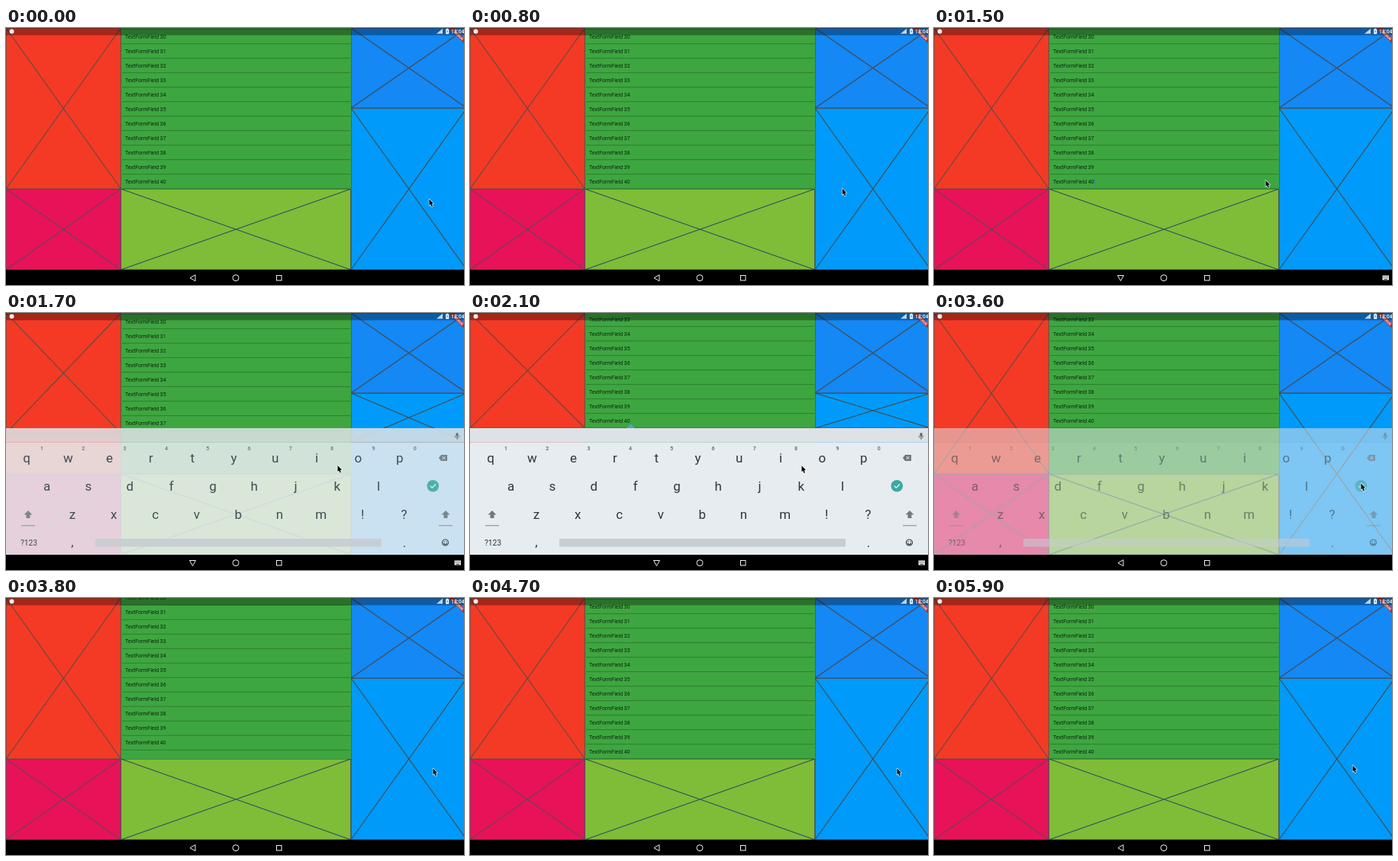
These frames come from a looping animation (600x337 px, 6 s). An HTML page with a canvas:

```html
<!DOCTYPE html>
<html lang="en">
<head>
<meta charset="utf-8">
<title>Form list with keyboard</title>
<style>
html, body { margin: 0; width: 100%; height: 100%; overflow: hidden; background: #000; }
canvas { display: block; width: 600px; height: 337px; }
</style>
</head>
<body>
<canvas id="stage" width="600" height="337"></canvas>
<script>
const c = document.getElementById('stage').getContext('2d');
const LOOP = 6000, STEP = 100;
const FOCUS = 1500, HIDE = 3600;
const BODY = 317, UPPER = 211, KEYS_TOP = 151, ROW = 19;
const RIGHT = 603.5; // the screen is cropped slightly at the right

// time, x, y of the pointer tip
const pointerPath = [
  [0, 554, 224], [300, 554, 224], [1200, 434, 199], [2400, 434, 200],
  [2900, 527, 223], [3200, 559, 223], [5200, 559, 223], [5900, 548, 219], [6000, 554, 224]
];

const ramp = (t, a, b) => Math.max(0, Math.min(1, (t - a) / (b - a)));
const mix = (a, b, k) => a + (b - a) * k;
const easeOut = v => 1 - (1 - v) ** 2;

function pointerAt(t) {
  const i = pointerPath.findIndex(p => p[0] > t);
  const [t0, x0, y0] = pointerPath[i - 1], [t1, x1, y1] = pointerPath[i];
  const k = ramp(t, t0, t1);
  return [mix(x0, x1, k), mix(y0, y1, k)];
}

function rect(x, y, w, h, color) {
  c.fillStyle = color;
  c.fillRect(x, y, w, h);
}

function text(s, x, y, size, color, align = 'center', weight = 400) {
  c.font = `${weight} ${size}px Roboto, sans-serif`;
  c.textAlign = align;
  c.textBaseline = 'alphabetic';
  c.fillStyle = color;
  c.fillText(s, x, y);
}

function trace(points, closed = true) {
  c.beginPath();
  points.forEach(([x, y]) => c.lineTo(x, y));
  if (closed) c.closePath();
}

function fillShape(points, color) {
  trace(points);
  c.fillStyle = color;
  c.fill();
}

function strokeShape(points, color, width = 1, closed = true) {
  trace(points, closed);
  c.strokeStyle = color;
  c.lineWidth = width;
  c.stroke();
}

function circle(x, y, r) {
  c.beginPath();
  c.arc(x, y, r, 0, Math.PI * 2);
}

function placeholder(x, y, w, h, fill, line) {
  rect(x, y, w, h, fill);
  c.strokeStyle = line;
  c.lineWidth = 1.15;
  c.beginPath();
  c.rect(x, y, w, h);
  c.moveTo(x, y);
  c.lineTo(x + w, y + h);
  c.moveTo(x + w, y);
  c.lineTo(x, y + h);
  c.stroke();
}

function drawList(height, shift, t) {
  c.save();
  c.beginPath();
  c.rect(150.5, 0, 301.5, height);
  c.clip();
  rect(150, 0, 303, height, '#3ea640');
  for (let n = 29; n <= 40; n++) {
    const y = 11.5 + (n - 30) * ROW + shift;
    text('TextFormField ' + n, 156, y + 2.4, 6.95, '#0c220f', 'left');
    rect(152, y + 8.8, 299, 0.8, 'rgba(10,50,15,.42)');
  }
  const y = 201.5 + shift;
  if (t >= FOCUS && t < HIDE) {
    if ((t - FOCUS) % 1000 < 500) rect(210.2, y - 4, 0.8, 8, '#2a78c0');
    if (t > 1800) fillShape([[210.5, y + 4], [216, y + 9.5], [205, y + 9.5]], '#4aa3d0');
  }
  c.restore();
}

function drawBody(t) {
  const shrink = t < HIDE ? easeOut(ramp(t, 1500, 1800)) : 0;
  const height = mix(BODY, KEYS_TOP, shrink);
  const upper = mix(UPPER, KEYS_TOP, shrink);
  const shift = t < HIDE ? -60 * easeOut(ramp(t, 1700, 2000))
    : t < 4500 ? -60 * Math.exp((HIDE - t) / 121) : 0;
  rect(0, 0, 150.5, UPPER, '#f43a25');
  rect(150.5, 0, 301.5, UPPER, '#3ea640');
  rect(452, 0, 148, BODY, '#009afa');
  placeholder(0, UPPER, 150.5, BODY - UPPER, '#e81259', '#6b4058');
  placeholder(150.5, UPPER, 301.5, BODY - UPPER, '#7fbc38', '#2c5060');
  placeholder(452, 105, RIGHT - 452, height - 105, '#009afa', '#48494a');
  placeholder(452, 0, RIGHT - 452, 105, '#1488f5', '#48494a');
  placeholder(0, 0, 150.5, upper, '#f43a25', '#5e4a48');
  drawList(upper, shift, t);
  strokeShape([[150.5, 0], [150.5, BODY]], '#455a50', 0.8, false);
}

function drawStatusBar() {
  c.save();
  c.translate(RIGHT, 0);
  c.rotate(Math.PI / 4);
  rect(-20, 11.7, 40, 5, '#b52a2c');
  text('DEBUG', 0, 16, 4.6, '#fff', 'center', 700);
  c.restore();
  rect(0, 0, 600, 9.5, 'rgba(0,0,0,.33)');
  circle(7.5, 4.5, 3);
  c.fillStyle = '#f5f0ee';
  c.fill();
  fillShape([[572, 0.8], [572, 7.6], [564, 7.6]], 'rgba(255,255,255,.75)');
  rect(576.2, 1.5, 4, 6.3, '#fff');
  rect(577.4, 0.8, 1.6, 1, '#fff');
  rect(577.7, 3, 1, 3, '#4070a0');
  text('18:04', 583, 6.9, 6.9, '#fff', 'left', 500);
}

function drawShift(x) {
  fillShape([[x, 259], [x + 5.5, 264.5], [x + 2.5, 264.5], [x + 2.5, 269],
    [x - 2.5, 269], [x - 2.5, 264.5], [x - 5.5, 264.5]], '#6e7a81');
  rect(x - 9, 278.3, 18, 1, '#7d888e');
}

function drawKeyboard(t) {
  const enter = ramp(t, FOCUS, 1720);
  const alpha = t < HIDE ? enter * (0.96 + 0.04 * ramp(t, 1700, 1800))
    : 0.55 * (1 - ramp(t, HIDE, 3800));
  if (alpha === 0) return;
  const ink = '#2b383f', gray = '#6a767d';
  c.save();
  c.beginPath();
  c.rect(0, 0, 600, BODY);
  c.clip();
  c.globalAlpha = alpha;
  c.translate(0, 40 * (1 - ramp(t, FOCUS, 1700)));
  rect(0, KEYS_TOP, 600, 18.5, '#dce2e5');
  rect(0, KEYS_TOP + 18.5, 600, BODY - KEYS_TOP - 18.5, '#e6ecef');

  [['qwertyuiop', 27, 196], ['asdfghjkl', 53.7, 233], ['zxcvbnm!?', 87, 270]].forEach(([row, x, y]) =>
    [...row].forEach((key, i) => text(key, x + i * 54.3, y, 17, ink)));
  [...'1234567890'].forEach((key, i) => text(key, 47 + i * 54.3, 180.3, 7, gray, 'center', 700));

  // microphone
  c.lineCap = 'round';
  strokeShape([[591, 158.5], [591, 161]], '#5a676e', 3, false);
  c.beginPath();
  c.arc(591, 161, 3, 0, Math.PI);
  c.lineWidth = 0.8;
  c.stroke();
  strokeShape([[591, 164], [591, 166]], '#5a676e', 0.8, false);
  c.lineCap = 'butt';

  // backspace and confirm
  fillShape([[567, 190], [570, 186], [578, 186], [578, 194], [570, 194]], gray);
  strokeShape([[571.5, 188], [575.5, 192]], '#eef2f4', 1, false);
  strokeShape([[575.5, 188], [571.5, 192]], '#eef2f4', 1, false);
  circle(559.3, 226.7, 7.8);
  c.fillStyle = '#3caaa0';
  c.fill();
  strokeShape([[555.8, 226.7], [558.3, 229.2], [563, 224.5]], '#fff', 1.1, false);

  drawShift(29);
  drawShift(576);
  text('?123', 30, 304.8, 10.3, ink);
  text(',', 87, 306, 17, ink);
  text('.', 522, 306.5, 17, ink);
  c.beginPath();
  c.roundRect(117, 296, 375, 10.5, 1.5);
  c.fillStyle = '#c7cdd1';
  c.fill();

  // smiley
  c.strokeStyle = ink;
  c.lineWidth = 1.2;
  circle(575.5, 301, 4);
  c.stroke();
  c.beginPath();
  c.arc(575.5, 301.5, 2, 0, Math.PI);
  c.stroke();
  rect(573.5, 299, 1.2, 1.2, ink);
  rect(576.5, 299, 1.2, 1.2, ink);
  c.restore();
}

function drawNavBar(open) {
  const white = '#f2f2f2';
  rect(0, BODY, 600, 20, '#000');
  strokeShape(open ? [[240.5, 324.5], [248.5, 324.5], [244.5, 331.5]]
    : [[248, 323.7], [248, 331.7], [241, 327.7]], white);
  circle(301, 327.7, 4);
  c.stroke();
  c.strokeRect(354.5, 324.5, 6.5, 6.5);
  if (!open) return;
  rect(587.5, 324.5, 8.5, 6, white);
  for (let i = 0; i < 4; i++) {
    rect(588.5 + i * 1.9, 325.6, 0.9, 0.9, '#222');
    rect(588.5 + i * 1.9, 327.3, 0.9, 0.9, '#222');
  }
  rect(589.8, 329, 4, 0.8, '#222');
}

function drawPointer(t) {
  c.save();
  c.translate(...pointerAt(t));
  c.lineJoin = 'round';
  const arrow = [[0.5, 0.5], [0.5, 8.5], [2.2, 7], [3.5, 10.2], [4.9, 9.6], [3.7, 6.5], [6, 6.3]];
  strokeShape(arrow, 'rgba(255,255,255,.85)', 1.4);
  fillShape(arrow, '#000');
  c.restore();
}

function frame(now) {
  const t = Math.floor(now % LOOP / STEP) * STEP;
  drawBody(t);
  drawStatusBar();
  drawKeyboard(t);
  drawNavBar(t >= FOCUS && t < HIDE);
  drawPointer(t);
  requestAnimationFrame(frame);
}

requestAnimationFrame(frame);
</script>
</body>
</html>
```
